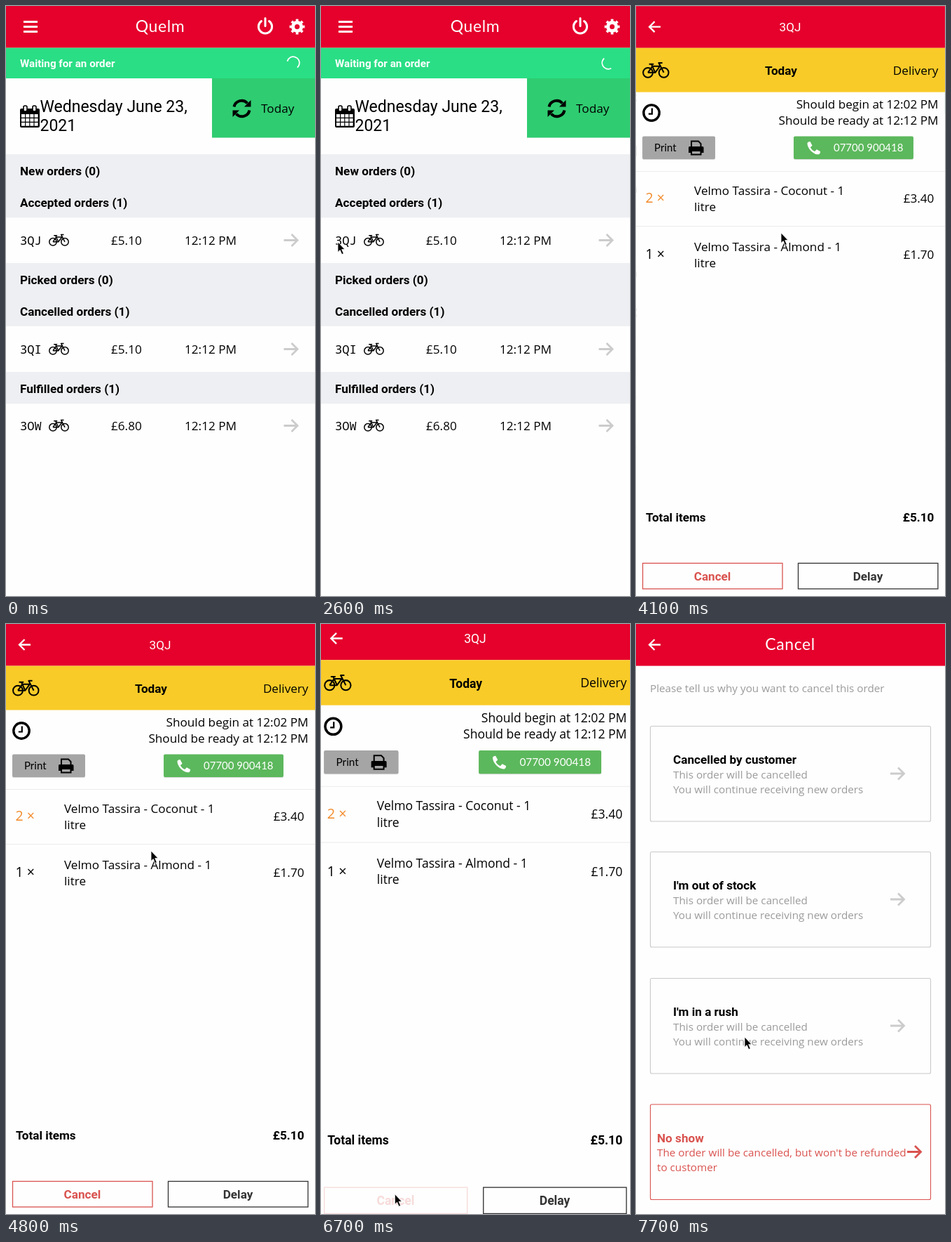
Recreate the animation shown at these times as an HTML page. Size 441 by 840 pixels, loop 8 s.

```html
<!DOCTYPE html>
<html lang="en">
<head>
<meta charset="utf-8">
<title>Order handling</title>
<style>
  html, body { margin: 0; width: 100%; height: 100%; overflow: hidden; background: #fefefe; }
  svg { display: block; font: 17.15px "Open Sans", sans-serif; }
  .line { fill: none; stroke: currentColor; }
  .bold { font-family: Roboto, sans-serif; font-weight: 700; }
  .date { font: 23px Roboto, sans-serif; }
  .code { font-family: Roboto, sans-serif; fill: #fff; text-anchor: middle; }
  .title { font: 23px Lato, sans-serif; letter-spacing: .6px; fill: #fff; text-anchor: middle; }
  .label { font: 15px Lato, sans-serif; }
  .mono { font-family: "Noto Sans Mono", monospace; }
  .notice { font-size: 15.2px; }
  .count { font-size: 19.5px; }
  .small { font-size: 15.25px; fill: #9b9b9b; }
  .mid { text-anchor: middle; }
  .end { text-anchor: end; }
  .scene { transform-origin: 220.5px 420px; }
</style>
</head>
<body>
<svg id="stage" width="441" height="840" viewBox="0 0 441 840"></svg>
<script>
const RED = '#e5012c', DANGER = '#d9534f', BAR = 59.6;

const text = (x, y, str, cls = '', fill = '') =>
  `<text x="${x}" y="${y}" class="${cls}"${fill && ` style="fill:${fill}"`}>${str}</text>`;
const rect = (x, y, w, h, fill, extra = '') =>
  `<rect x="${x}" y="${y}" width="${w}" height="${h}" fill="${fill}" ${extra}/>`;
const line = (d, width, color = '#000', extra = '') =>
  `<path class="line" d="${d}" stroke-width="${width}" color="${color}" ${extra}/>`;
const at = (x, y, body, scale = 1) => `<g transform="translate(${x} ${y}) scale(${scale})">${body}</g>`;

const page = rect(0, 0, 441, 840, '#fefefe');
const header = rect(0, 0, 441, BAR, RED);
const back = line('M35 29.5H19.5M26.5 22l-7.5 7.5 7.5 7.5', 2.3, '#fff');
const arrow = (x, y, color = '#ccc') => at(x, y, line('M-10 0H9M1-8.5L9.5 0 1 8.5', 2.8, color));
const bike = (x, y, scale) => at(x, y, `<g class="line" stroke-width="1.5" stroke-linejoin="round">
  <circle cx="6" cy="11.8" r="5.2"/><circle cx="23" cy="11.8" r="5.2"/>
  <path d="M6 11.8L10.8 5H18.8L13.8 11.8H6M13.8 11.8L9.8 3M7.2 2.8h5M23 11.8L17.6 1.4H21.5"/></g>`, scale);

const hamburger = line('M25 22.5h20M25 29.5h20M25 36.5h20', 2.8, '#fff');
const power = line('M364.5 21.5a9.6 9.6 0 1 0 11 0M370 17.5v11', 3, '#fff', 'stroke-linecap="round"');
const gear = at(415.5, 29.5, `<g fill="none" stroke="#fff"><circle r="6" stroke-width="5"/>
  <circle r="9.2" stroke-width="3.4" pathLength="16" stroke-dasharray="1" stroke-dashoffset=".5"/></g>`);
const calendar = rect(20, 146, 28, 27, '#000', 'rx="2"') +
  [0, 1, 2, 3].map(c => [0, 1, 2].map(r =>
    rect(22 + c * 6.2, 154 + r * 6, 5, 4.7, '#fff')).join('')).join('') +
  [25, 38].map(x => rect(x, 142, 5, 8, '#fff', 'rx="2" stroke="#000" stroke-width="1.6"')).join('');
const refreshHalf = '<path class="line" d="M-11-2.5A11 11 0 0 1 8-7.5" stroke-width="4"/><path d="M13-12v9.5H3.5z"/>';
const refresh = at(336.5, 146, `${refreshHalf}<g transform="rotate(180)">${refreshHalf}</g>`);
const clock = '<circle class="line" cx="22" cy="152" r="11.2" stroke-width="3.4"/>' + line('M22.8 145.5v8h-5', 2.2);
const printer = at(75, 191, `<path d="M1 9h19q1.5 0 1.5 2v7H0v-7Q0 9 1 9z"/>
  <path d="M4 10V1.5h10l3.5 3.5v5zM4 15h13.5v5.5H4z" fill="#a5a5a5" stroke="#000" stroke-width="2"/>`);
const phone = at(253.5, 202, `<path fill="#fff" d="M-9-6.5C-9-8-6-9.3-5-9L-2-3.6C-2-2.5-5-1.5-4.5-.5-3 2.2-1 4 1.5 5
  2.5 5 3.5 2.2 4.5 2.2L9.5 5C10 6.5 8.5 9 7 9.2 0 10-9 1-9-6.5z"/>`);

const section = (y, str) => rect(0, y, 441, 45.3, '#eeeff2') + text(20, y + 30, str, 'bold');
const order = (y, code, price, id = '') => `<g ${id && `id="${id}"`}>` + text(20, y, code, 'mono') +
  bike(61, y - 16, 1) + text(150, y, price) + text(255, y, '12:12 PM') + arrow(406.5, y - 6.5) + '</g>';

const list = page + header + hamburger + text(220, 37, 'Quelm', 'title') + power + gear +
  rect(0, BAR, 441, 103 - BAR, '#2ade85') + text(20, 87, 'Waiting for an order', 'bold notice', '#fff') +
  '<circle id="spinner" cx="410" cy="81" r="8.8" fill="none" stroke="#fff" stroke-width="1.8" pathLength="360"/>' +
  calendar + text(48.5, 151, 'Wednesday June 23,', 'date') + text(48.5, 178, '2021', 'date') +
  rect(294, 103, 147, 84.5, '#2fcc71') + refresh + text(364, 152, 'Today') +
  section(211, 'New orders (0)') + section(256, 'Accepted orders (1)') + order(340, '3QJ', '£5.10', 'row') +
  section(366, 'Picked orders (0)') + section(410.5, 'Cancelled orders (1)') + order(495, '3QI', '£5.10') +
  section(521, 'Fulfilled orders (1)') + order(604, '3OW', '£6.80');

const button = (x, w, fill) => rect(x, 186.5, w, 32.5, '#0002', 'rx="2"') + rect(x, 185.5, w, 32.5, fill, 'rx="2"');
const outline = (x, label, color) =>
  rect(x + .5, 793.5, 199.5, 36.5, '#fefefe', `stroke="${color}" stroke-width="1.3"`) +
  text(x + 100, 818, label, 'bold mid', color);
const item = (y, count, name, price, color = '#000') => text(13.5, y, `${count} ×`, 'count', color) +
  text(83, y - 11.5, `Velmo Tassira - ${name} - 1`) + text(83, y + 11.5, 'litre') + text(425.5, y, price, 'end');

const detail = page + header + back + text(220, 36, '3QJ', 'code') +
  rect(0, BAR, 441, 122.5 - BAR, '#f9cb28') + bike(9, 79, 1.33) +
  text(207, 98, 'Today', 'bold mid') + text(431.5, 97.5, 'Delivery', 'end') +
  clock + text(431.5, 146, 'Should begin at 12:02 PM', 'end') + text(431.5, 169, 'Should be ready at 12:12 PM', 'end') +
  button(9, 104, '#a5a5a5') + text(26, 207, 'Print', 'label') + printer +
  button(225, 171, '#5cb85c') + phone + text(282, 207, '07700 900418', 'label', '#fff') +
  line('M0 235.5H441M0 313.5H441', 1, '#ececec') +
  item(280, 2, 'Coconut', '£3.40', '#f28c2d') + item(360, 1, 'Almond', '£1.70') +
  text(14, 734, 'Total items', 'bold') + text(425.5, 734, '£5.10', 'bold end') +
  `<g id="cancel">${outline(9, 'Cancel', DANGER)}</g>` + outline(231, 'Delay', '#333');

const frame = (y, color) => rect(20.5, y + .5, 400, 135.5, '#fefefe', `rx="2" stroke="${color}" stroke-width="1.1"`);
const reason = (y, name) => frame(y, '#c9c9c9') + text(53, y + 54, name, 'bold') +
  text(53, y + 74.5, 'This order will be cancelled', 'small') +
  text(53, y + 95.5, 'You will continue receiving new orders', 'small') + arrow(373, y + 68);

const reasons = page + header + back + text(220, 37, 'Cancel', 'title') +
  text(20, 97, 'Please tell us why you want to cancel this order', 'small') +
  reason(145, 'Cancelled by customer') + reason(324, "I'm out of stock") + reason(504, "I'm in a rush") +
  frame(683.5, DANGER) + text(30, 737.5, 'No show', 'bold', DANGER) +
  text(30, 758, "The order will be cancelled, but won't be refunded", 'small', DANGER) +
  text(30, 779, 'to customer', 'small', DANGER) + arrow(397, 751.5, DANGER);

const pointer = '<path id="pointer" d="M0 0V14.5L3.2 11.6 5.8 17.6 8.3 16.5 5.7 10.6H10z" stroke="#fff" stroke-width=".8"/>';

const get = id => document.getElementById(id);
get('stage').innerHTML = [list, detail, reasons]
  .map((body, i) => `<g class="scene" id="scene${i}">${body}</g>`).join('') + pointer;
const scenes = [0, 1, 2].map(i => get('scene' + i));
const [row, cancel, spinner, cursor] = ['row', 'cancel', 'spinner', 'pointer'].map(get);

// time, x, y
const path = [
  [1000, 338, 338], [1300, 233, 320], [1600, 108, 305], [1900, 40, 322], [2600, 24, 336], [2900, 24, 336],
  [3400, 112, 333], [3700, 207, 323], [4900, 207, 323], [5100, 164, 360], [5300, 145, 420], [5400, 139, 503],
  [5600, 92, 658], [5800, 88, 812], [6200, 104, 813], [7300, 107, 810], [7400, 139, 774], [7500, 166, 684],
  [7700, 155, 588], [8000, 155, 588]];
const opens = [3884, 6669];

const clamp = v => Math.min(1, Math.max(0, v));
const ease = u => u < 1 / 6 ? .4 * (6 * u) ** 2 : 1 - .6 * (1.2 * (1 - u)) ** 5;
const trim = u => 1 - (1 - clamp(u) ** 2) ** 5;
const press = (t, start) => 1 - .8 * clamp((t - start) / 150);

function moveCursor(t) {
  const i = path.findIndex(p => p[0] > t);
  cursor.style.display = i > 0 ? '' : 'none';
  if (i < 1) return;
  const [a, b] = [path[i - 1], path[i]], k = (t - a[0]) / (b[0] - a[0]);
  cursor.setAttribute('transform', `translate(${a[1] + (b[1] - a[1]) * k} ${a[2] + (b[2] - a[2]) * k})`);
}

function spin(t) {
  const cycles = (t - 1000) / 1333, turn = Math.floor(cycles), phase = (cycles - turn) * 2;
  const tail = 270 * trim(phase - 1), sweep = 270 * trim(phase) - tail + 8;
  const start = 145 + .2295 * (t - 1000) + 270 * turn + tail + (t < 100 ? 190 : 0);
  spinner.setAttribute('stroke-dasharray', `${sweep} 360`);
  spinner.setAttribute('transform', `rotate(${start} 410 81)`);
}

function draw(now) {
  const t = Math.floor(now % 8000 / 100) * 100;
  scenes.forEach((scene, i) => {
    const since = i ? t - opens[i - 1] : 1e4, until = i < 2 ? t - opens[i] : -1;
    const scale = .85 + .15 * ease(clamp(since / 300)) + .15 * ease(clamp(until / 300));
    scene.style.transform = `scale(${scale})`;
    scene.style.opacity = clamp((since - 35) / 50);
    scene.style.display = since < 0 || until >= 300 ? 'none' : '';
  });
  row.style.opacity = press(t, 3700);
  cancel.style.opacity = press(t, 6450);
  spin(t);
  moveCursor(t);
  requestAnimationFrame(draw);
}
requestAnimationFrame(draw);
</script>
</body>
</html>
```
